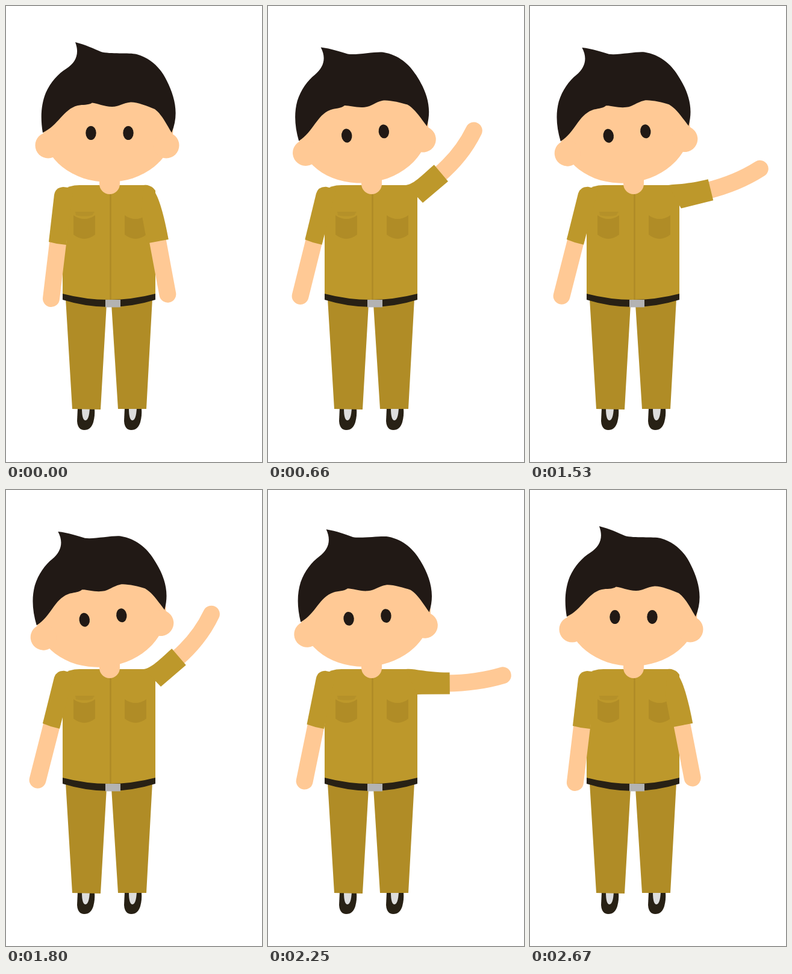
An HTML page that plays this animation: 425 px wide and 756 px high, repeating every 2700 ms.

```html
<!DOCTYPE html>
<html lang="en">
<head>
<meta charset="utf-8">
<title>Waving boy</title>
<style>
html, body { margin: 0; width: 100%; height: 100%; overflow: hidden; background: #fff; }
svg { display: block; width: 100%; height: 100%; }
.skin { fill: #ffc995; }
.limb { fill: none; stroke: #ffc995; stroke-width: 28; stroke-linecap: round; }
.shirt { fill: #bd982b; }
.shade { fill: #b08c26; }
.dark { fill: #282115; }
.hair { fill: #211915; }
</style>
</head>
<body>
<svg viewBox="0 0 425 756">
  <defs>
    <g id="shoe">
      <path class="dark" d="M119 667L118 688Q119 703 130 703Q141 703 145 690Q148 679 147 667Z"/>
      <path fill="#ddd" d="M126 667Q126 687 132 687Q138 686 139 667Z"/>
    </g>
    <path id="pocket" class="shade" d="M112 347Q130 359 148 347V379Q130 393 112 379Z"/>
  </defs>

  <use href="#shoe"/>
  <use href="#shoe" x="78"/>
  <path class="shade" d="M99 485L167 494L157 669L110 668ZM175 494L243 485L233 668L186 668Z"/>

  <path class="shirt" d="M94 306Q104 297 122 297H233Q243 298 248 306V480Q171 500 94 480Z"/>
  <path fill="none" stroke="#af8b27" stroke-width="2.5" d="M173.5 308V488"/>
  <use href="#pocket"/>
  <use href="#pocket" x="85"/>
  <path fill="#b59129" d="M115 341H147L143 347Q130 350 116 347Z"/>
  <path class="dark" d="M94 477Q171 497 248 477V487Q171 511 94 487Z"/>
  <rect x="165" y="487" width="25" height="12.5" fill="#b3b3b3"/>
  <path class="skin" d="M155 284H189V295A17 17 0 0 1 155 295Z"/>

  <g id="restArm">
    <path class="limb" d="M87 385L75 485"/>
    <path class="shirt" d="M80 313Q82 301 95 300L112 302L100 396Q85 395 71 391Z"/>
  </g>
  <path id="forearm" class="limb"/>
  <path id="sleeve" class="shirt"/>

  <g id="head">
    <ellipse class="skin" cx="169.5" cy="205" rx="108" ry="87"/>
    <circle class="skin" cx="70" cy="231" r="21.5"/>
    <circle class="skin" cx="266" cy="231" r="21.5"/>
    <path class="hair" d="M61 210C57 186 58 164 66 144C74 126 87 112 100 104C117 93 122 78 115 60
      C132 64 146 71 158 76C172 80 205 77 217 80C242 87 258 105 267 124C280 150 288 179 275 210
      C266 195 258 179 247 171C236 166 216 159 207 159.500C193 161 188 167 176 167C163 167 151 161 143 160.500
      C136 165 128 163 119 165C95 171 87 198 61 210Z"/>
    <g class="hair">
      <ellipse class="eye" cx="141" cy="210.500"/>
      <ellipse class="eye" cx="203" cy="210.500"/>
    </g>
  </g>
</svg>
<script>
const LOOP = 2700, STEP = 30;
const RAISED = 765, LOW = 1370, LEAVE = 1935;
const $ = id => document.getElementById(id);
const eyes = document.querySelectorAll('.eye');

// Sine-eased value between [time, value] keys
function tween(t, keys) {
  const i = keys.findIndex(key => key[0] > t);
  const [t0, v0] = keys[i - 1], [t1, v1] = keys[i];
  return v0 + (v1 - v0) * (1 - Math.cos(Math.PI * (t - t0) / (t1 - t0))) / 2;
}

// Point at a distance from p, angle in degrees
function polar([x, y], length, angle) {
  const a = angle * Math.PI / 180;
  return [x + length * Math.cos(a), y + length * Math.sin(a)];
}

function drawArm(angle) {
  const cuff = polar([241, 321 + 0.12 * angle], 60.7, angle);
  const upper = polar(cuff, 18, angle - 90);
  const lower = polar(cuff, 18, angle + 90);
  const bend = polar(upper, -(42 + 0.45 * angle), angle);
  const armpit = polar(lower, -55, angle);
  $('sleeve').setAttribute('d',
    `M229 297C243 295 ${bend} ${upper}L${lower}L${armpit}Z`);

  const start = polar(cuff, -6, angle);
  const elbow = polar(cuff, 45, angle);
  const hand = polar(cuff, 89, angle - (80 - angle) * 0.1);
  $('forearm').setAttribute('d', `M${start}Q${elbow} ${hand}`);
}

function draw(t) {
  const lean = tween(t, [[0, 0], [RAISED, 1], [LEAVE, 1], [LOOP, 0]]);
  $('head').setAttribute('transform', `rotate(${-6.9 * lean} 175 302)`);
  $('restArm').setAttribute('transform', `rotate(${7.5 * lean} 97 312)`);
  drawArm(tween(t, [[0, 79.5], [RAISED, -46], [LOW, -6.5], [LEAVE, -46], [LOOP, 79.5]]));

  const blink = Math.max(0, ...[360, 2070].map(at => 1 - Math.abs(t - at) / 120));
  const open = 1 - 0.75 * blink;
  for (const eye of eyes) {
    eye.setAttribute('rx', 8.7 * open);
    eye.setAttribute('ry', 11.5 * open);
  }
}

function tick() {
  draw(Math.floor(performance.now() % LOOP / STEP) * STEP);
  requestAnimationFrame(tick);
}
tick();
</script>
</body>
</html>
```
